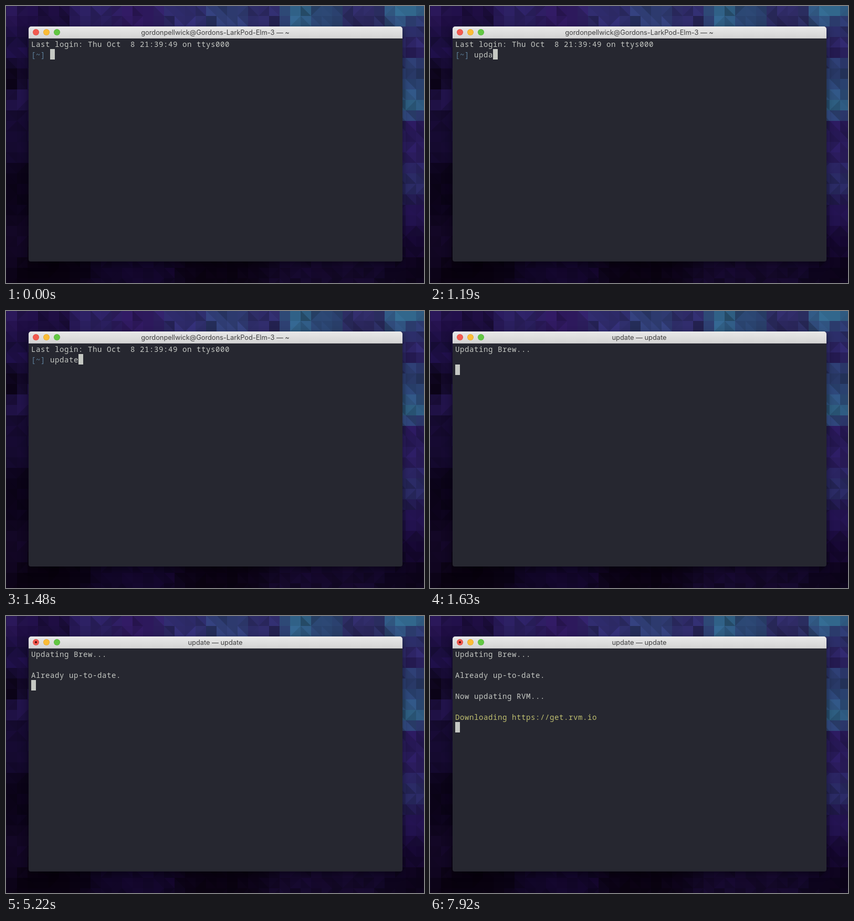
Animation of 796 by 528 pixels, one loop 8000 ms. Source, as an HTML page with a canvas:

```html
<!DOCTYPE html>
<html lang="en">
<head>
<meta charset="utf-8">
<title>Terminal update</title>
<style>
html, body { margin: 0; width: 100%; height: 100%; overflow: hidden; background: #12062a; }
canvas { display: block; }
</style>
</head>
<body>
<canvas id="stage" width="796" height="528"></canvas>
<script>
const W = 796, H = 528, LOOP = 8000, CELL = 20;
const CHAR = 9, ROW = 20, LEFT = 48, TOP = 62;
const WIN = { x: 43, y: 39, w: 712, h: 448, bar: 23 };
const FG = '#c5c8c3', BLUE = '#5f819d', YELLOW = '#c0c070';
const ctx = document.getElementById('stage').getContext('2d');

// Wallpaper tones at a few points; cells blend between them
const tones = [
  [10, 9, '#2b1859'], [30, 29, '#1d0d40'], [90, 15, '#1c0d3d'], [170, 15, '#2b2060'],
  [250, 20, '#2b1757'], [340, 15, '#2c2965'], [420, 20, '#2d3a6e'], [500, 20, '#2d2964'],
  [560, 9, '#2e5d81'], [600, 25, '#2d4876'], [680, 20, '#2c285f'], [765, 9, '#2f6284'],
  [775, 45, '#2a2c64'], [775, 85, '#291d5a'], [775, 115, '#2a3969'], [775, 150, '#2a416f'],
  [771, 189, '#2d5c7f'], [775, 230, '#281858'], [775, 280, '#281a58'], [775, 335, '#28285f'],
  [785, 400, '#22124d'], [775, 455, '#150730'], [785, 508, '#0b0318'], [600, 508, '#14082a'],
  [400, 508, '#0a0213'], [250, 508, '#12062a'], [70, 508, '#08010f'], [20, 70, '#1b0e40'],
  [10, 149, '#0b0317'], [30, 169, '#211349'], [20, 230, '#150a30'], [20, 360, '#0b0319'],
  [20, 450, '#110622']
].map(([x, y, c]) => ({ x, y, rgb: [1, 3, 5].map(i => parseInt(c.substr(i, 2), 16)) }));

let seed = 29;
function rand() {
  seed = (seed * 1664525 + 1013904223) % 4294967296;
  return seed / 4294967296;
}

function toneAt(x, y) {
  const sum = [0, 0, 0];
  let total = 0;
  for (const t of tones) {
    const k = 1 / (((x - t.x) ** 2 + (y - t.y) ** 2 + 40) ** 2);
    total += k;
    t.rgb.forEach((v, i) => sum[i] += v * k);
  }
  return sum.map(v => v / total);
}

const shade = (rgb, k) => `rgb(${rgb.map(v => Math.round(v * k)).join(',')})`;

function drawWallpaper(g) {
  for (let y = -1; y < H; y += CELL) {
    for (let x = -19; x < W; x += CELL) {
      const rgb = toneAt(x + 10, y + 10);
      const base = 0.88 + rand() * 0.24;
      const step = (rand() - 0.5) * 0.42;
      g.fillStyle = shade(rgb, base + step / 2);
      g.fillRect(x, y, CELL, CELL);
      g.fillStyle = shade(rgb, base - step / 2);
      g.beginPath();
      if (rand() < 0.5) {
        g.moveTo(x, y);
        g.lineTo(x + CELL, y + CELL);
      } else {
        g.moveTo(x + CELL, y);
        g.lineTo(x, y + CELL);
        g.lineTo(x + CELL, y + CELL);
      }
      if (rand() < 0.5) g.lineTo(x, y + CELL);
      else g.lineTo(x + CELL, y);
      g.fill();
    }
  }
}

function disc(g, x, y, r, color) {
  g.fillStyle = color;
  g.beginPath();
  g.arc(x, y, r, 0, Math.PI * 2);
  g.fill();
}

function drawWindow(g) {
  const { x, y, w, h, bar } = WIN;
  g.save();
  g.beginPath();
  g.roundRect(x, y, w, h, [5, 5, 4, 4]);
  g.shadowColor = 'rgba(0,0,0,0.45)';
  g.shadowBlur = 14;
  g.shadowOffsetY = 5;
  g.fillStyle = '#262730';
  g.fill();
  g.shadowColor = 'transparent';
  g.clip();
  const grad = g.createLinearGradient(0, y, 0, y + bar);
  grad.addColorStop(0, '#e9e9e9');
  grad.addColorStop(1, '#d3d3d3');
  g.fillStyle = grad;
  g.fillRect(x, y, w, bar);
  g.fillStyle = '#b9b9bb';
  g.fillRect(x, y + bar - 1, w, 1);
  g.restore();
  [['#f25a50', '#dc463e'], ['#fbbc36', '#e0a12d'], ['#62c743', '#4eae35']].forEach(([fill, rim], i) => {
    disc(g, 57 + i * 20, 50, 6, rim);
    disc(g, 57 + i * 20, 50, 5.4, fill);
  });
}

function makeBackdrop() {
  const layer = document.createElement('canvas');
  layer.width = W;
  layer.height = H;
  const g = layer.getContext('2d');
  drawWallpaper(g);
  drawWindow(g);
  return layer;
}
const backdrop = makeBackdrop();

function print(text, col, row, color = FG) {
  ctx.font = '14px "Noto Sans Mono", "DejaVu Sans Mono", monospace';
  ctx.letterSpacing = '0.6px';
  ctx.textAlign = 'left';
  ctx.fillStyle = color;
  ctx.fillText(text, LEFT + col * CHAR, TOP + row * ROW + 16);
}

function cursor(col, row) {
  ctx.fillStyle = FG;
  ctx.fillRect(LEFT + col * CHAR, TOP + row * ROW, CHAR, ROW);
}

function title(text) {
  ctx.font = '12.8px Inter, "Open Sans", sans-serif';
  ctx.letterSpacing = '0px';
  ctx.textAlign = 'center';
  ctx.fillStyle = '#3e3e3f';
  ctx.fillText(text, 398.5, 55);
}

// [start time, characters typed]
const keys = [[450, 1], [890, 2], [1190, 4], [1330, 5], [1480, 6]];
// [start time, row, text, color, cursor row]
const output = [
  [1630, 0, 'Updating Brew...', FG, 2],
  [5220, 2, 'Already up-to-date.', FG, 3],
  [7620, 4, 'Now updating RVM...', FG, 6],
  [7920, 6, 'Downloading https://get.rvm.io', YELLOW, 7]
];

function drawPrompt(t) {
  title('gordonpellwick@Gordons-LarkPod-Elm-3 — ~');
  print('Last login: Thu Oct  8 21:39:49 on ttys000', 0, 0);
  print('[~]', 0, 1, BLUE);
  const typed = keys.reduce((n, [at, count]) => t >= at ? count : n, 0);
  print('update'.slice(0, typed), 4, 1);
  cursor(4 + typed, 1);
}

function drawOutput(t) {
  title('update — update');
  if (t >= 1770) disc(ctx, 57, 50, 2, '#4c0505');
  let end = 0;
  for (const [at, row, text, color, next] of output) {
    if (t < at) break;
    print(text, 0, row, color);
    end = next;
  }
  cursor(0, end);
}

function frame(now) {
  const t = now % LOOP;
  ctx.drawImage(backdrop, 0, 0);
  if (t < output[0][0]) drawPrompt(t);
  else drawOutput(t);
}

const start = performance.now();
function tick() {
  frame(performance.now() - start);
  requestAnimationFrame(tick);
}
tick();
</script>
</body>
</html>
```
